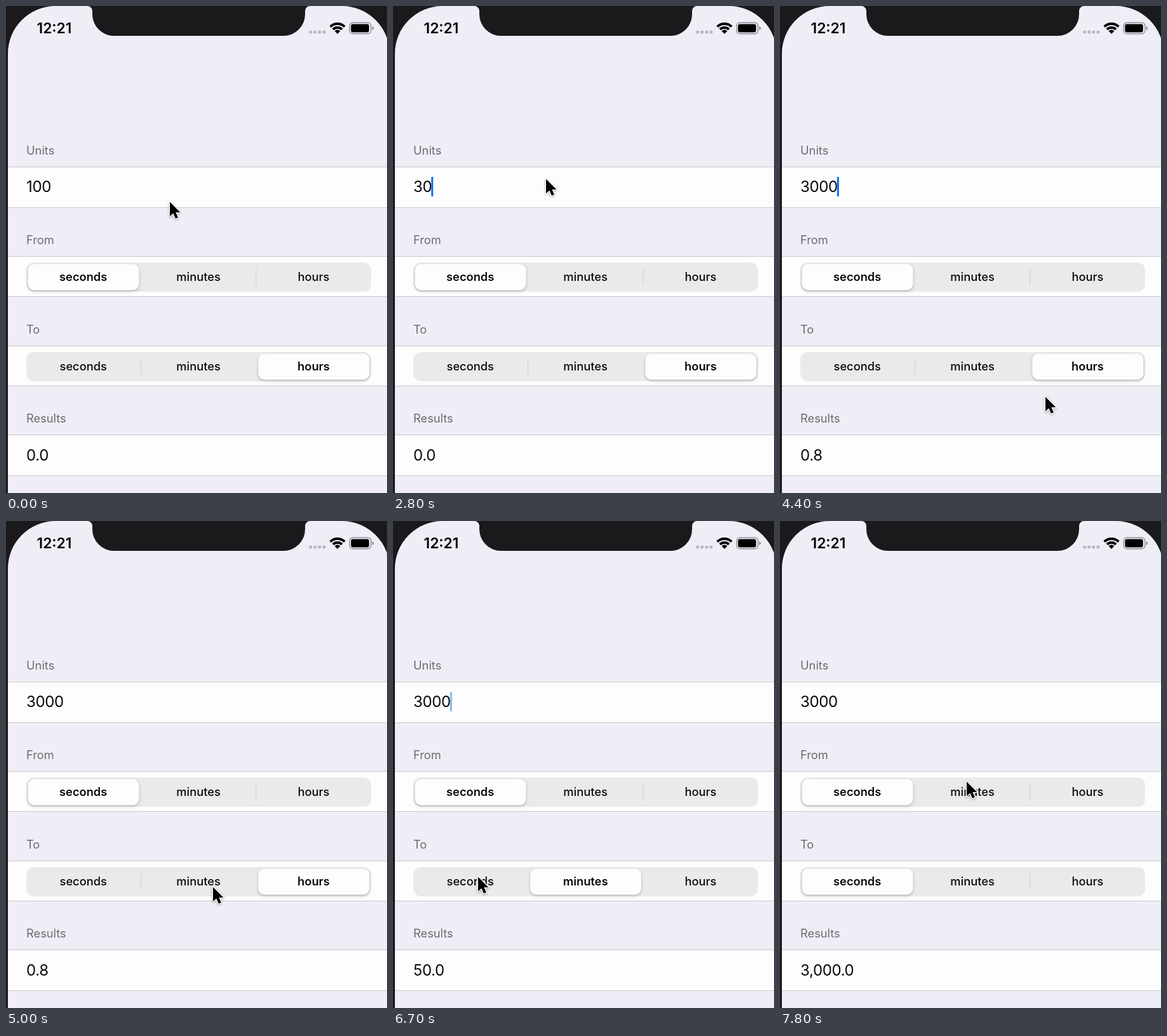
Write an HTML page that moves like this. It is 600 px wide and 767 px high and loops after 8000 ms.

```html
<!DOCTYPE html>
<html lang="en">
<head>
<meta charset="utf-8">
<title>Unit converter</title>
<style>
  html, body { margin: 0; width: 100%; height: 100%; overflow: hidden; background: #efeef6; }
  svg { display: block; width: 100vw; height: 100vh; font-family: Inter, Roboto, sans-serif; }
  .head { font-size: 18.3px; fill: #6c6b70; }
  .value { font-size: 24px; letter-spacing: -.35px; fill: #0b0b0c; }
  .hint { font-size: 24px; letter-spacing: -.3px; fill: #c3c2c6; }
  .seg { font-size: 18.3px; font-weight: 500; text-anchor: middle; fill: #0b0b0c; }
  .seg.on { font-weight: 600; }
  .clock { font-size: 22.8px; font-weight: 600; }
  .thumb { filter: drop-shadow(0 2px 2.5px rgba(0, 0, 0, .18)) drop-shadow(0 1px 1px rgba(0, 0, 0, .08)); }
  .pointer { filter: drop-shadow(0 1.5px 1.5px rgba(0, 0, 0, .35)); }
</style>
</head>
<body>
<svg id="stage" viewBox="0 0 600 767" preserveAspectRatio="none"></svg>
<script>
const LOOP = 8000, STEP = 100;
const stage = document.getElementById('stage');

function add(tag, attrs, text) {
  const el = document.createElementNS('http://www.w3.org/2000/svg', tag);
  for (const k in attrs) el.setAttribute(k, attrs[k]);
  if (text) el.textContent = text;
  stage.append(el);
  return el;
}
const rect = (x, y, width, height, fill, rx = 0) => add('rect', { x, y, width, height, fill, rx });
const label = (cls, x, y, text) => add('text', { class: cls, x, y }, text);

// Form rows
rect(0, 0, 600, 767, '#efeef6');
['Units', 'From', 'To', 'Results'].forEach((name, i) => {
  const y = 253 + i * 140.75;
  const top = Math.round(y), bottom = Math.floor(y + 64);
  label('head', 32, top - 19, name);
  rect(0, top, 600, bottom - top + 1, '#c9c8cc');
  rect(0, top + 1, 600, bottom - top - 1, '#fefdfe');
});

// Segmented controls
const UNITS = ['seconds', 'minutes', 'hours'];
const PITCH = 181.4;
function segments(y) {
  rect(32, y, 543, 46, '#eae9eb', 12);
  const lines = [0, 1].map(i => rect(212 + i * PITCH, y + 10, 1, 26, '#cfced2'));
  const thumb = rect(34.5, y + 2.5, 175, 41, '#fefdfe', 10);
  thumb.setAttribute('class', 'thumb');
  const texts = UNITS.map((name, i) => label('seg', 121.7 + i * PITCH, y + 29, name));
  return (pos, chosen) => {
    thumb.setAttribute('x', 34.5 + pos * PITCH);
    lines.forEach((line, i) => {
      line.setAttribute('opacity', Math.min(1, Math.abs(pos - i), Math.abs(pos - i - 1)));
    });
    texts.forEach((text, i) => text.setAttribute('class', i === chosen ? 'seg on' : 'seg'));
  };
}
segments(404)(0, 0);
const setTo = segments(545);

const hint = label('hint', 33, 293, 'Units to convert');
const units = label('value', 32, 293);
const result = label('value', 32, 716);
const caret = rect(31.5, 269, 3, 31, '#0a6ff5', 1.2);

// Phone frame and status bar
add('path', {
  fill: '#1a191c',
  d: 'M0 0H604V75A75 75 0 0 0 529 0H479A8 8 0 0 0 471 8V13A34 34 0 0 1 437 47' +
     'H170A34 34 0 0 1 136 13V8A8 8 0 0 0 128 0H78A75 75 0 0 0 3 75V767H0Z'
});
label('clock', 48.5, 43, '12:21');
for (let i = 0; i < 4; i++) add('circle', { cx: 479.6 + i * 7.1, cy: 41, r: 2.6, fill: '#bab9c0' });
for (const r of [10, 16]) {
  const d = r * Math.SQRT1_2;
  add('path', {
    d: `M${522 - d} ${44 - d}A${r} ${r} 0 0 1 ${522 + d} ${44 - d}`,
    fill: 'none', stroke: '#000', 'stroke-width': 3.8
  });
}
add('path', { d: 'M522 44L517.6 39.6Q522 35.6 526.4 39.6Z' });
add('rect', { x: 541.2, y: 26.2, width: 33.6, height: 17.6, rx: 5, fill: 'none', stroke: '#8f8e94', 'stroke-width': 1.4 });
rect(543.3, 28.4, 28.4, 13.2, '#000', 3);
add('path', { d: 'M576.6 32Q579.4 33 579.4 35T576.6 38Z', fill: '#8f8e94' });

const pointer = add('path', {
  class: 'pointer',
  d: 'M0 0V24L5.6 18.9L9.4 27.6L13.6 25.8L9.9 17.3H17.3Z',
  fill: '#000', stroke: '#fff', 'stroke-width': 3, 'paint-order': 'stroke', 'stroke-linejoin': 'round'
});

const clamp = (v, lo = 0, hi = 1) => Math.min(hi, Math.max(lo, v));
function ease(t, from, to) {
  const u = clamp((t - from) / (to - from));
  return u * u * (3 - 2 * u);
}

// Pointer trips: where each ends, and when it runs
const HOME = { x: 258, y: 309 };
const TRIPS = [
  { x: 241, y: 273, from: 0, to: 400 },
  { x: 420, y: 620, from: 3650, to: 4450 },
  { x: 326, y: 577, from: 4450, to: 5000 },
  { x: 134, y: 561, from: 6200, to: 6700 },
  { x: 294, y: 411, from: 7300, to: 7800 }
];
function pointerAt(t) {
  return TRIPS.reduce((p, trip) => {
    const u = ease(t, trip.from, trip.to);
    return { x: p.x + (trip.x - p.x) * u, y: p.y + (trip.y - p.y) * u };
  }, HOME);
}

// Erase one number, then type the next
function entry(t) {
  if (t < 1700) return '100'.slice(0, clamp(3 - Math.floor((t - 700) / 130), 0, 3));
  return '3000'.slice(0, clamp(Math.floor((t - 1700) / 400), 0, 4));
}
function caretAlpha(t) {
  if (t < 600) return 0;
  if (t < 1300 || (t >= 2100 && t < 3400)) return 1;
  return clamp(.5 + 1.3 * Math.cos((t - 450) / 1000 * 2 * Math.PI));
}

function draw(t) {
  const text = entry(t);
  const pos = 2 - ease(t, 5400, 5800) - ease(t, 6800, 7200);
  const chosen = 2 - (t >= 5500) - (t >= 6900);
  units.textContent = text;
  hint.setAttribute('opacity', text ? 0 : 1);
  result.textContent = (text / 60 ** chosen).toLocaleString('en-US', {
    minimumFractionDigits: 1, maximumFractionDigits: 1
  });
  caret.setAttribute('x', 31.5 + (text ? units.getComputedTextLength() - .5 : 0));
  caret.setAttribute('opacity', caretAlpha(t));
  setTo(pos, chosen);
  const { x, y } = pointerAt(t);
  pointer.setAttribute('transform', `translate(${x} ${y - .5}) scale(.95)`);
}

const start = performance.now();
function tick() {
  const t = (performance.now() - start) % LOOP;
  draw(Math.floor(t / STEP) * STEP);
  requestAnimationFrame(tick);
}
tick();
</script>
</body>
</html>
```
